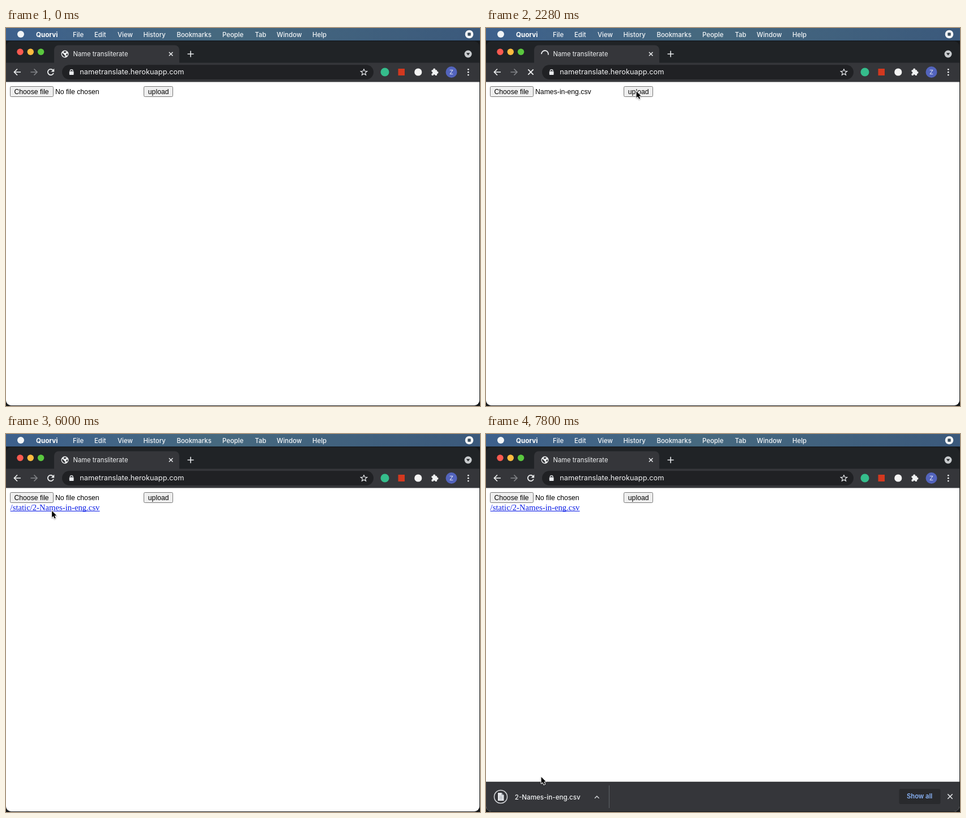
Animation of 837x669 px, one loop 8000 ms. Source, as an HTML page with a canvas:

```html
<!DOCTYPE html>
<html lang="en">
<head>
<meta charset="utf-8">
<title>Name transliterate</title>
<style>
html, body { margin: 0; width: 100%; height: 100%; overflow: hidden; background: #16181a; }
canvas { display: block; }
</style>
</head>
<body>
<canvas id="stage" width="837" height="669"></canvas>
<script>
const ctx = document.getElementById('stage').getContext('2d');
const TAU = Math.PI * 2;
const LOOP = 8000;
const UI = 'Inter, sans-serif';
const ARIAL = '12.25px "Liberation Sans", Arial, sans-serif';
const TIMES = '14.7px "Liberation Serif", Times, serif';

const EARLY = [0, 100, 330, 600, 800, 1000, 1280, 1400, 1600, 2000];
const BEATS = [0, 280, 400, 600, 800];
function hold(t) {
  if (t < 2280) return EARLY.filter(s => s <= t).pop();
  const second = Math.floor(t / 1000) * 1000;
  return second + BEATS.filter(b => b <= t - second).pop();
}

// time, x, y of the pointer tip
const POINTER = [
  [600, 36, 123], [1000, 73, 113], [1280, 73, 113], [1600, 265, 112],
  [2280, 265, 112], [3000, 67.5, 262], [5400, 67.5, 262], [6000, 80.5, 136],
  [6280, 86, 133], [6800, 86, 133], [7000, 85, 160], [7800, 97, 607]
];

const clamp = v => Math.max(0, Math.min(1, v));
const ramp = (t, a, b) => clamp((t - a) / (b - a));
const mix = (a, b, k) => a + (b - a) * k;

function pointerAt(t) {
  const i = POINTER.findIndex(p => p[0] > t);
  if (i < 0) return POINTER[POINTER.length - 1].slice(1);
  const a = POINTER[Math.max(0, i - 1)], b = POINTER[i];
  const k = ramp(t, a[0], b[0]);
  return [mix(a[1], b[1], k), mix(a[2], b[2], k)];
}

function text(str, x, y, font, color, align = 'left') {
  ctx.font = font;
  ctx.fillStyle = color;
  ctx.textAlign = align;
  ctx.fillText(str, x, y);
}
function rect(x, y, w, h, color, r = 0, edge) {
  ctx.beginPath();
  ctx.roundRect(x, y, w, h, r);
  ctx.fillStyle = color;
  ctx.fill();
  if (edge) { ctx.strokeStyle = edge; ctx.lineWidth = 1; ctx.stroke(); }
}
function disc(x, y, r, color) {
  ctx.beginPath();
  ctx.arc(x, y, r, 0, TAU);
  ctx.fillStyle = color;
  ctx.fill();
}
function arc(x, y, r, from, to, color, width) {
  ctx.beginPath();
  ctx.arc(x, y, r, from, to);
  ctx.strokeStyle = color;
  ctx.lineWidth = width;
  ctx.stroke();
}
function trace(points) {
  ctx.beginPath();
  for (let i = 0; i < points.length; i += 2) ctx.lineTo(points[i], points[i + 1]);
}
function line(points, color, width) {
  trace(points);
  ctx.strokeStyle = color;
  ctx.lineWidth = width;
  ctx.stroke();
}
function poly(points, color) {
  trace(points);
  ctx.closePath();
  ctx.fillStyle = color;
  ctx.fill();
}
function at(x, y, draw, scale = 1) {
  ctx.save();
  ctx.translate(x, y);
  ctx.scale(scale, scale);
  draw();
  ctx.restore();
}
function cross(x, y, r, color, width) {
  line([x - r, y - r, x + r, y + r], color, width);
  line([x - r, y + r, x + r, y - r], color, width);
}

function menuBar() {
  const g = ctx.createLinearGradient(0, 0, 837, 0);
  g.addColorStop(0, '#3d608c');
  g.addColorStop(0.45, '#46697f');
  g.addColorStop(1, '#3b597c');
  rect(0, 0, 837, 22, g);
  rect(0, 22, 837, 1, '#18222c');
  disc(26, 11, 6, '#f1f4f6');
  text('Quorvi', 53, 15.5, '700 11.6px ' + UI, '#fff');
  const items = { File: 118, Edit: 156, View: 197, History: 242.5, Bookmarks: 301.5,
    People: 382, Tab: 439.5, Window: 478, Help: 541 };
  for (const name in items) text(name, items[name], 15.5, '500 11.4px ' + UI, '#f4f6f8');
  disc(818, 11, 7.3, '#f6f7f8');
  rect(815.3, 8.3, 5.4, 5.4, '#3c4f60', 0.8);
}

function globe(scale) {
  at(104, 46, () => {
    disc(0, 0, 6.5, '#f1f3f4');
    poly([-5, -2, -2, 0, -1, 2, 1, 3, 0, 5.2, -3, 4.2, -5.2, 1], '#35363a');
    poly([-1, -5, 2.6, -4.6, 2, -2.6, -1, -1.8, -2.4, -3.2], '#35363a');
    poly([2, 0, 5, -1, 5, 1.6, 3.2, 3.6], '#35363a');
  }, scale);
}

function browserTop(t) {
  const loading = t >= 2280 && t < 5280;
  rect(0, 23, 837, 39, '#202326');
  rect(0, 61.5, 837, 34, '#35363a');
  ['#fb5a50', '#fdbb3f', '#5ac83f'].forEach((c, i) => disc(25 + i * 18.3, 42.3, 5.7, c));

  rect(85, 30.5, 221, 33, '#35363a', [8, 8, 0, 0]);
  if (loading) {
    const spin = (t - 3600) / 1000 * TAU;
    arc(104, 46, 6, spin - 1.15, spin + 2.25, '#e8eaed', 1.8);
  } else {
    globe(t < 5280 ? 1 : mix(0.62, 1, ramp(t, 5280, 5600)));
  }
  text('Name transliterate', 118.5, 49.7, '11.2px ' + UI, '#f1f3f4');
  cross(291.2, 46, 3.3, '#e8eaed', 1.5);
  line([320.5, 46, 331.5, 46], '#e8eaed', 1.6);
  line([326, 40.5, 326, 51.5], '#e8eaed', 1.6);
  disc(816, 46, 6.5, '#c8cbce');
  poly([812.8, 44.2, 819.2, 44.2, 816, 48.6], '#25282b');

  at(20, 78, () => {
    line([6, 0, -5, 0], '#f1f3f4', 1.7);
    line([0, -5.5, -5.5, 0, 0, 5.5], '#f1f3f4', 1.7);
  });
  at(49.5, 78, () => {
    line([-6, 0, 5, 0], '#84868a', 1.6);
    line([0, -5.5, 5.5, 0, 0, 5.5], '#84868a', 1.6);
  });
  if (loading) cross(79, 78, 4.6, '#f1f3f4', 1.8);
  else {
    arc(79, 78, 5.2, 0.35, TAU - 0.75, '#f1f3f4', 1.8);
    poly([85.2, 71.8, 85.2, 77.4, 79.6, 77.4], '#f1f3f4');
  }

  rect(99, 65.2, 550, 25.8, '#202124', 13);
  rect(111.8, 76.5, 7.8, 6.5, '#e8eaed', 1);
  arc(115.7, 76, 2.4, Math.PI, TAU, '#e8eaed', 1.4);
  text('nametranslate.herokuapp.com', 130.3, 82.4, '12.8px ' + UI, '#f3f4f5');

  const star = [];
  for (let i = 0; i < 11; i++) {
    const a = i * TAU / 10 - TAU / 4, r = i % 2 ? 2.6 : 6;
    star.push(632 + r * Math.cos(a), 78.4 + r * Math.sin(a));
  }
  line(star, '#e8eaed', 1.2);

  disc(669, 78, 7.5, '#35bd8c');
  rect(692.5, 72, 11.5, 12, '#d3381f');
  disc(727.8, 78, 6.6, '#f4f4f4');
  rect(751.5, 74.2, 9.6, 9.8, '#f1f3f4', 1.2);
  disc(756.2, 73.7, 2.1, '#f1f3f4');
  disc(761.4, 78.8, 2.1, '#f1f3f4');
  disc(751.6, 79, 1.7, '#35363a');
  disc(756.2, 84, 1.7, '#35363a');
  disc(786.5, 78, 10, '#5364bd');
  text('Z', 786.5, 82, '11px ' + UI, '#e8eaf6', 'center');
  [73.3, 78.2, 83.1].forEach(y => disc(816.3, y, 1.35, '#f1f3f4'));
}

function page(t) {
  rect(0, 95.5, 837, 574, '#fff');
  const pressed = t >= 2000 && t < 2280;
  rect(7.5, 103.5, 76, 18, '#efefef', 2, '#767676');
  text('Choose file', 14.4, 116.8, ARIAL, '#000');
  const chosen = t >= 1400 && t < 5280;
  text(chosen ? 'Names-in-eng.csv' : 'No file chosen', 87, 116.8, ARIAL, '#000');
  rect(243.5, 103.5, 51, 18, pressed ? '#d8d8d8' : '#efefef', 2, '#767676');
  text('upload', 250.8, 116.8, ARIAL, '#000');
  if (t >= 5280) {
    text('/static/2-Names-in-eng.csv', 7.6, 135, TIMES, '#0a1ce6');
    rect(7.6, 136, 158, 1, '#0a1ce6');
  }
}

function status(str, top, alpha) {
  ctx.save();
  ctx.globalAlpha = alpha;
  ctx.shadowColor = 'rgba(0,0,0,.25)';
  ctx.shadowBlur = 4;
  rect(-4, top, 281, 22, '#35363a', [0, 3, 0, 0]);
  ctx.shadowBlur = 0;
  text(str, 4.6, top + 13.2, '10.95px ' + UI, '#dfe1e4');
  ctx.restore();
}

function shelf(t) {
  const top = mix(618, 616, ramp(t, 7000, 7400)) + (t < 7000 ? 25 : 0);
  const open = ramp(t, 7000, 7600);
  const mid = top + 26;
  rect(0, top, 837, 60, '#35363a');
  rect(0, top - 0.5, 837, 1, '#1f2123');
  arc(26, mid, 11.5, 0, TAU, open < 1 ? '#b5cbe8' : '#d5d7da', open < 1 ? 2 : 1.5);
  poly([21, mid - 7, 27.5, mid - 7, 31.5, mid - 3, 31.5, mid + 7, 21, mid + 7], '#e6e8eb');
  poly([27.5, mid - 7, 27.5, mid - 3, 31.5, mid - 3], '#8d949c');
  [-1, 1.5, 4].forEach(dy => line([23.5, mid + dy, 29, mid + dy], '#8d949c', 0.8));
  const split = mix(48, 217, open);
  rect(split, top + 6, 1, 40, open < 1 ? '#53698a' : '#5f6368');
  if (open > 0) {
    ctx.save();
    ctx.globalAlpha = open;
    ctx.beginPath();
    ctx.rect(0, top, split, 60);
    ctx.clip();
    text('2-Names-in-eng.csv', 50.8, mid + 4.6, '500 11.6px ' + UI, '#f1f3f4');
    line([192, mid + 2.8, 195.8, mid - 1, 199.6, mid + 2.8], '#d5d7da', 1.4);
    ctx.restore();
  }
  rect(729.5, top + 12, 73, 27, '#292a2d', 3);
  text('Show all', 743, mid + 3.3, '600 11.2px ' + UI, open ? '#8ab4f8' : '#a9c0e6');
  cross(819.5, mid - 0.4, 4.2, '#e0e2e5', 1.5);
}

function downloadBadge(y, alpha) {
  ctx.save();
  ctx.globalAlpha = alpha;
  disc(33, y, 33.5, '#f3f4f6');
  poly([29, y - 13, 37, y - 13, 37, y - 4, 41.5, y - 4, 33, y + 6, 24.5, y - 4, 29, y - 4], '#4f73d8');
  rect(18, y + 19, 30, 3.5, '#4668c4');
  ctx.restore();
}

function draggedFile(x, y) {
  at(x, y, () => {
    ctx.save();
    ctx.globalAlpha = 0.82;
    ctx.shadowColor = 'rgba(0,0,0,.45)';
    ctx.shadowBlur = 4;
    ctx.shadowOffsetY = 1;
    const g = ctx.createLinearGradient(-46, -17, -4, 38);
    g.addColorStop(0, '#fbfbfb');
    g.addColorStop(1, '#ececec');
    poly([-46, -17, -20, -17, -4, -2, -4, 38, -46, 38], g);
    ctx.shadowBlur = ctx.shadowOffsetY = 0;
    poly([-20, -17, -19, -3, -4, -2], '#fff');
    line([-20, -17, -19, -3, -4, -2], '#dcdcdc', 0.8);
    for (let i = 0; i < 17; i++) {
      line([-42, -12 + i * 2.8, -39 + i * 7 % 4, -12 + i * 2.8], '#b4b4b4', 0.8);
    }
    ctx.restore();
    text('csv', -25, 32, '700 7px ' + UI, '#505050', 'center');
    rect(-80, 45, 110, 16, '#cda442', 3);
    text('Names-in-eng.csv', 26.3, 57, '600 11.2px ' + UI, '#fff', 'right');
    disc(9.5, 20, 8.8, '#e9f5e6');
    disc(9.5, 20, 8, '#23a91d');
    line([5, 20, 14, 20], '#fff', 2);
    line([9.5, 15.5, 9.5, 24.5], '#fff', 2);
  });
}

function outlined(points) {
  ctx.lineJoin = 'round';
  ctx.save();
  ctx.shadowColor = 'rgba(0,0,0,.35)';
  ctx.shadowBlur = 2;
  ctx.shadowOffsetY = 1;
  trace(points);
  ctx.closePath();
  ctx.strokeStyle = '#fff';
  ctx.lineWidth = 2;
  ctx.stroke();
  ctx.restore();
  poly(points, '#000');
  ctx.lineJoin = 'miter';
}
function pointer(x, y, hand) {
  at(x, y, () => outlined(hand
    ? [-1.5, 0, 1, 0, 1.2, 5, 6, 6, 7.5, 8, 6, 14.5, -1, 14.5, -5.5, 8, -4, 7, -1.5, 9]
    : [0.6, 0, 0.6, 11.6, 3.2, 9.2, 5.2, 13.6, 7.2, 12.7, 5.2, 8.4, 8.7, 8.2]));
}

function draw(t) {
  rect(0, 0, 837, 669, '#16181a');
  menuBar();
  ctx.save();
  ctx.beginPath();
  ctx.roundRect(0, 23.5, 836, 644.5, 9);
  ctx.clip();
  browserTop(t);
  page(t);

  if (t >= 4400 && t < 5600) {
    status('Waiting for nametranslate.herokuapp.com...', 649, t < 5400 ? 1 : 0.5);
  }
  const hasShelf = t >= 6800;
  if (t >= 6400 && t < 7280) {
    const top = t < 6800 ? 649 : t < 7000 ? 625 : 600;
    status('...herokuapp.com/static/2-Names-in-eng.csv', top, 1);
  }
  if (hasShelf) shelf(t);
  if (hasShelf && t < 7280) downloadBadge(mix(545, 585, ramp(t, 6800, 7000)), 0.85);
  ctx.restore();

  if (t >= 600) {
    const [x, y] = pointerAt(t);
    if (t < 1280) draggedFile(x, y);
    pointer(x, y, t >= 6280 && t < 7000);
  }
}

function tick(now) {
  draw(hold(now % LOOP));
  requestAnimationFrame(tick);
}
requestAnimationFrame(tick);
</script>
</body>
</html>
```
